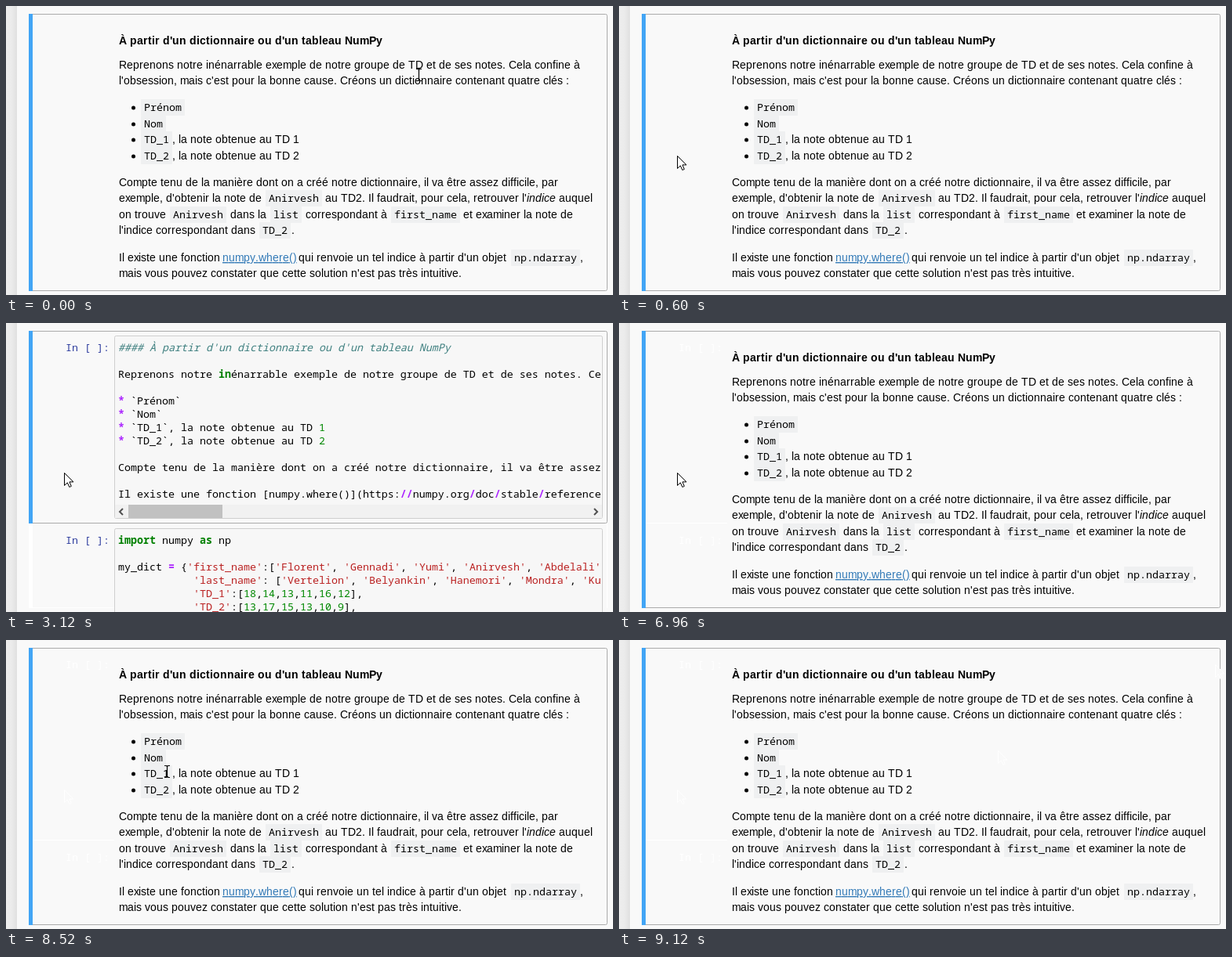
Animation, 774 px wide and 369 px high, one loop 9480 ms. Source, as an HTML page:

```html
<!DOCTYPE html>
<html lang="fr">
<head>
<meta charset="utf-8">
<title>Cellule de notebook</title>
<style>
html, body { margin: 0; width: 100%; height: 100%; overflow: hidden; background: #f9f9f9; }
svg { display: block; width: 774px; height: 369px; }
text { white-space: pre; fill: #000; }
.sans { font: 14px "Liberation Sans", Arial, sans-serif; }
.mono { font: 13.333px "Noto Sans Mono", "DejaVu Sans Mono", monospace; }
.bold { font-weight: bold; }
.ital { font-style: italic; }
.link { fill: #337ab7; text-decoration: underline; }
.prompt { fill: #303f9f; }
.white { fill: #fff; }
.comment { fill: #408080; font-style: italic; }
.key { fill: #008000; font-weight: bold; }
.op { fill: #aa22ff; font-weight: bold; }
.num { fill: #008800; }
.str { fill: #ba2121; }
.item { fill: #0055aa; }
.tick { fill: #aa5500; }
.label { fill: #0000cc; text-decoration: underline; }
.url { fill: #aa1111; }
.head { font: bold 15.4px "Liberation Sans", Arial, sans-serif; fill: #0000ff; }
</style>
</head>
<body>
<svg id="stage" viewBox="0 0 774 369">
  <defs>
    <linearGradient id="shade">
      <stop offset="0" stop-color="#eeeeee"/>
      <stop offset=".5" stop-color="#ebebeb"/>
      <stop offset="1" stop-color="#e0e0e0"/>
    </linearGradient>
    <clipPath id="code"><rect x="139" y="0" width="621" height="369"/></clipPath>
    <path id="arrowShape" d="M.5 .5V16.5L4.3 12.9L6.8 18.5L9.3 17.4L6.9 11.9H12Z"/>
  </defs>
  <rect width="774" height="369" fill="#f9f9f9"/>
  <rect width="14" height="369" fill="url(#shade)"/>
</svg>
<script>
const stage = document.getElementById('stage');
const pen = document.createElement('canvas').getContext('2d');

function add(parent, tag, attrs = {}, text) {
  const el = document.createElementNS('http://www.w3.org/2000/svg', tag);
  for (const k in attrs) el.setAttribute(k, attrs[k]);
  if (text !== undefined) el.textContent = text;
  parent.appendChild(el);
  return el;
}
const group = (parent = stage) => add(parent, 'g');
const rect = (g, x, y, width, height, fill, more) =>
  add(g, 'rect', { x, y, width, height, fill, ...more });

// Screen-hinted type: every advance is a whole pixel.
function sans(g, x, y, str, cls = '') {
  const bold = cls === 'bold';
  const style = bold ? 'bold ' : cls === 'ital' ? 'italic ' : '';
  pen.font = style + '14px "Liberation Sans", Arial, sans-serif';
  const hinted = bold ? { r: 6 } : { m: 11, x: 6 };
  const xs = [];
  for (const ch of str) {
    xs.push(x);
    x += hinted[ch] || Math.round(pen.measureText(ch).width);
  }
  add(g, 'text', { x: xs.join(' '), y, class: 'sans ' + cls }, str);
}

function mono(g, x, y, str, cls = '') {
  return add(g, 'text', { x, y, class: 'mono ' + cls }, str);
}

function chip(g, x, y, str) {
  rect(g, x - 4, y - 15, str.length * 8 + 8, 21, '#eff0f1', { rx: 1 });
  mono(g, x, y, str);
}

// Splits a line into coloured runs; rules are [class, pattern].
function code(g, y, line, rules, base = '') {
  const el = mono(g, 143, y, '', base);
  const all = new RegExp(rules.map(r => '(' + r[1] + ')').join('|'), 'g');
  let at = 0;
  for (const m of line.matchAll(all)) {
    add(el, 'tspan', {}, line.slice(at, m.index));
    const hit = m.slice(1).findIndex(v => v !== undefined);
    add(el, 'tspan', { class: rules[hit][0] }, m[0]);
    at = m.index + m[0].length;
  }
  add(el, 'tspan', {}, line.slice(at));
}

function frame(g, height) {
  rect(g, 29.5, 10.5, 737, height, 'none', { stroke: '#ababab', rx: 2 });
  rect(g, 29, 10, 5, height + 1, '#42a5f5');
}

function inputBox(g, y, height) {
  rect(g, 138.5, y + .5, 622, height, '#f7f7f7', { stroke: '#cfcfcf', rx: 2 });
}

const prompts = (g, cls) => [36, 282].forEach(y => mono(g, 76, y, 'In [ ]:', cls));

function drawTrace(g) {
  prompts(g, 'white');
  rect(g, 34, 255, 104, 1, '#fff');
}

function drawPage(g) {
  frame(g, 353);
  sans(g, 144, 49, "À partir d'un dictionnaire ou d'un tableau NumPy", 'bold');
  sans(g, 144, 80, 'Reprenons notre inénarrable exemple de notre groupe de TD et de ses notes. Cela confine à');
  sans(g, 144, 100, "l'obsession, mais c'est pour la bonne cause. Créons un dictionnaire contenant quatre clés :");
  ['Prénom', 'Nom', 'TD_1', 'TD_2'].forEach((key, i) => {
    const y = Math.round(134 + i * 20.5);
    add(g, 'circle', { cx: 162.5, cy: y - 4, r: 2.5 });
    chip(g, 176, y, key);
    if (i > 1) sans(g, 212, y, ', la note obtenue au TD ' + (i - 1));
  });
  sans(g, 144, 230, 'Compte tenu de la manière dont on a créé notre dictionnaire, il va être assez difficile, par');
  sans(g, 144, 250, "exemple, d'obtenir la note de");
  chip(g, 335, 250, 'Anirvesh');
  sans(g, 407, 250, "au TD2. Il faudrait, pour cela, retrouver l'");
  sans(g, 664, 250, 'indice', 'ital');
  sans(g, 705, 250, 'auquel');
  sans(g, 144, 271, 'on trouve');
  chip(g, 213, 271, 'Anirvesh');
  sans(g, 286, 271, 'dans la');
  chip(g, 341, 271, 'list');
  sans(g, 382, 271, 'correspondant à');
  chip(g, 495, 271, 'first_name');
  sans(g, 583, 271, 'et examiner la note de');
  sans(g, 144, 291, "l'indice correspondant dans");
  chip(g, 327, 291, 'TD_2');
  sans(g, 364, 291, '.');
  sans(g, 144, 326, 'Il existe une fonction');
  sans(g, 276, 326, 'numpy.where()', 'link');
  sans(g, 373, 326, "qui renvoie un tel indice à partir d'un objet");
  chip(g, 648, 326, 'np.ndarray');
  sans(g, 732, 326, ',');
  sans(g, 144, 346, "mais vous pouvez constater que cette solution n'est pas très intuitive.");
}

function drawPython(g) {
  const rules = [
    ['comment', '^#.*'], ['str', "'[^']*'?"], ['key', '\\b(?:import|as|in)\\b'],
    ['op', '[*=]|\\/+'], ['num', '\\b\\d+\\b']
  ];
  rect(g, 29, 256, 5, 108, '#fff');
  rect(g, 34, 363, 104, 1, '#fff');
  rect(g, 766, 256, 1, 108, '#fff');
  frame(g, 245);
  inputBox(g, 16, 233);
  inputBox(g, 262, 120);
  prompts(g, 'prompt');
  const body = add(g, 'g', { 'clip-path': 'url(#code)' });
  const first = [
    "#### À partir d'un dictionnaire ou d'un tableau NumPy", '',
    'Reprenons notre inénarrable exemple de notre groupe de TD et de ses notes. Ce', '',
    '* `Prénom`', '* `Nom`',
    '* `TD_1`, la note obtenue au TD 1', '* `TD_2`, la note obtenue au TD 2', '',
    'Compte tenu de la manière dont on a créé notre dictionnaire, il va être assez', '',
    'Il existe une fonction [numpy.where()](https://numpy.org/doc/stable/reference'
  ];
  const pad = ' '.repeat(12);
  const second = [
    'import numpy as np', '',
    "my_dict = {'first_name':['Florent', 'Gennadi', 'Yumi', 'Anirvesh', 'Abdelali'",
    pad + "'last_name': ['Vertelion', 'Belyankin', 'Hanemori', 'Mondra', 'Ku",
    pad + "'TD_1':[18,14,13,11,16,12],",
    pad + "'TD_2':[13,17,15,13,10,9],"
  ];
  first.forEach((s, i) => code(body, 36 + i * 17, s, rules));
  second.forEach((s, i) => code(body, 282 + i * 17, s, rules));
  rect(g, 139, 232, 621, 17, '#f1f1f1');
  rect(g, 156, 232, 120, 17, '#c1c1c1');
  add(g, 'path', {
    d: 'M149 237L145 241L149 245M750 237L754 241L750 245',
    fill: 'none', stroke: '#505050', 'stroke-width': 2
  });
}

function drawMarkdown(g) {
  const rules = [
    ['tick', '`[^`]*`'], ['ital', '_indice_'], ['label', '\\[.*\\]'],
    ['url', '\\(https.*|^\\/reference.*\\)']
  ];
  frame(g, 400);
  rect(g, 34, 363, 104, 1, '#fff');
  inputBox(g, 16, 400);
  add(g, 'text', { x: 143, y: 37, class: 'head' }, "#### À partir d'un dictionnaire ou d'un tableau NumPy");
  [
    'Reprenons notre inénarrable exemple de notre groupe de TD et de ses notes.',
    "Cela confine à l'obsession, mais c'est pour la bonne cause. Créons un",
    'dictionnaire contenant quatre clés :', '',
    '* `Prénom`', '* `Nom`',
    '* `TD_1`, la note obtenue au TD 1', '* `TD_2`, la note obtenue au TD 2', '',
    'Compte tenu de la manière dont on a créé notre dictionnaire, il va être',
    "assez difficile, par exemple, d'obtenir la note de `Anirvesh` au TD2. Il",
    "faudrait, pour cela, retrouver l'_indice_ auquel on trouve `Anirvesh` dans",
    "la `list` correspondant à `first_name` et examiner la note de l'indice",
    'correspondant dans `TD_2`.', '',
    'Il existe une fonction [numpy.where()](https://numpy.org/doc/stable',
    '/reference/generated/numpy.where.html) qui renvoie un tel indice à partir',
    "d'un objet `np.ndarray`, mais vous pouvez constater que cette solution n'est",
    'pas très intuitive.'
  ].forEach((s, i) => code(g, 71 + i * 17, s, rules, s[0] === '*' ? 'item' : ''));
}

function arrow(g, x, y, fill, stroke) {
  return add(g, 'use', { href: '#arrowShape', transform: `translate(${x} ${y})`, fill, stroke });
}

const views = { page: group(), python: group(), markdown: group() };
drawPage(views.page);
drawPython(views.python);
drawMarkdown(views.markdown);
const trace = group();
drawTrace(trace);

// Faint marks left where the pointer rested: [time, x, y].
const marks = [[8520, 74, 191], [8880, 483, 141], [9120, 760, 31]].map(([from, x, y]) =>
  ({ from, el: arrow(stage, x, y, '#f9f9f9', '#fff') }));

const pointer = arrow(stage, 0, 0, '#fff', '#000');
const beam = add(stage, 'path', {
  d: 'M-3.5 -7.5H-1L0 -6.5L1 -7.5H3.5M0 -6.5V6.5M-3.5 7.5H-1L0 6.5L1 7.5H3.5',
  fill: 'none', stroke: '#000', 'stroke-width': 1.2
});

// Pointer stops: [time, shape, x, y].
const stops = [
  [0, 'beam', 526.5, 88], [120, 'beam', 450.5, 139], [240, 'beam', 330.5, 208],
  [360, 'beam', 206.5, 250], [480, 'arrow', 112, 226], [600, 'arrow', 74, 191],
  [8520, 'beam', 205.5, 168], [8640, 'beam', 342.5, 166], [8760, 'arrow', 483, 141],
  [8880, 'beam', 622.5, 100], [9000, 'arrow', 760, 31], [9120, 'none', 0, 0]
];

const show = (el, on) => el.setAttribute('visibility', on ? 'visible' : 'hidden');

function render(t) {
  const view = t < 3120 || t >= 6960 ? 'page' : t < 4680 ? 'python' : 'markdown';
  for (const name in views) show(views[name], name === view);
  show(trace, t >= 4680);
  marks.forEach(m => show(m.el, t >= m.from));
  const [, shape, x, y] = stops.filter(s => s[0] <= t).pop();
  show(pointer, shape === 'arrow');
  show(beam, shape === 'beam');
  const el = shape === 'beam' ? beam : pointer;
  el.setAttribute('transform', `translate(${x} ${y})`);
}

const start = performance.now();
function tick() {
  render((performance.now() - start) % 9480);
  requestAnimationFrame(tick);
}
tick();
</script>
</body>
</html>
```
